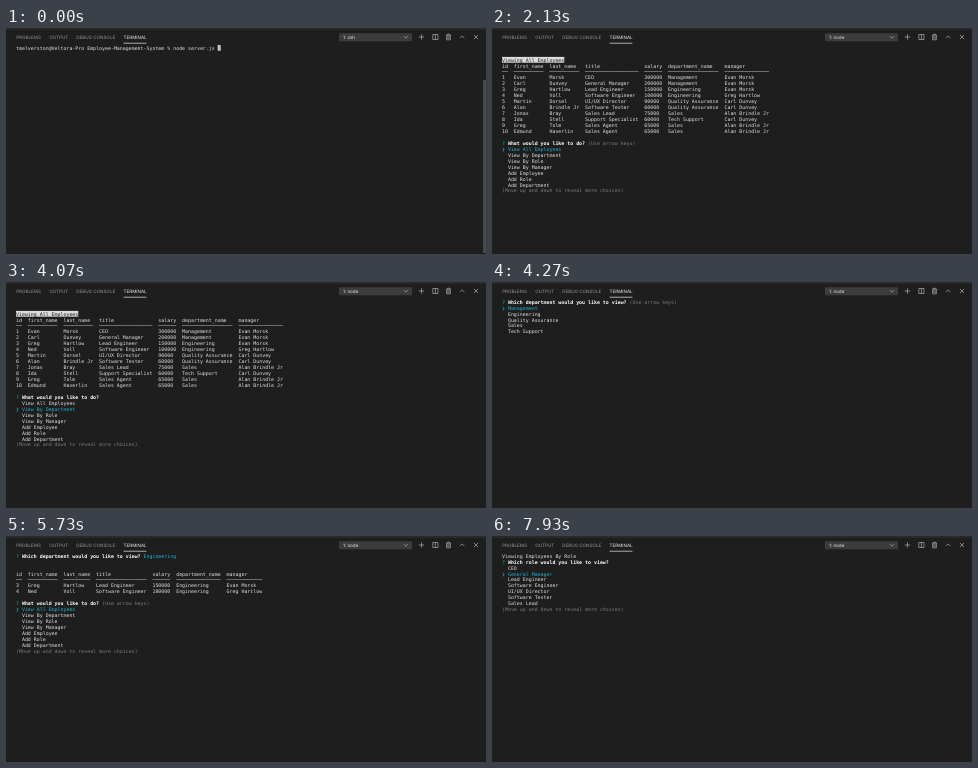
An HTML page for the animation above (8 s loop, 480x226 px).

```html
<!DOCTYPE html>
<html lang="en">
<head>
<meta charset="utf-8">
<title>Terminal session</title>
<style>
html, body { margin: 0; width: 100%; height: 100%; overflow: hidden; background: #1e1e1e; }
svg, pre { position: absolute; left: 0; top: 0; text-rendering: geometricPrecision; }
svg text { font: 4.55px Inter, sans-serif; fill: #989898; }
svg .on { fill: #ececec; }
svg path { fill: none; stroke: #c5c5c5; stroke-width: .6; }
pre {
  margin: 0; left: 10.2px; top: 17px; width: max-content;
  font: 49.27px/59.5px "DejaVu Sans Mono", monospace; color: #e2e2e2;
  transform: scale(.1); transform-origin: 0 0;
}
i { font-style: normal; }
.green { color: #0dbc79; }
.cyan { color: #1fb3d3; }
.dim { color: #7c7c7c; }
.bold { color: #fff; font-weight: bold; }
.inverse { color: #1e1e1e; background: #dcdcdc; }
.cursor { background: #c8c8c8; }
</style>
</head>
<body>
<svg width="480" height="226" viewBox="0 0 480 226">
  <rect width="480" height="1" y=".5" fill="#353535"/>
  <text x="10.2" y="11.1">PROBLEMS</text>
  <text x="43.2" y="11.1">OUTPUT</text>
  <text x="70.2" y="11.1">DEBUG CONSOLE</text>
  <text x="117.6" y="11.1" class="on">TERMINAL</text>
  <rect x="117.6" y="14.8" width="22.8" height=".7" fill="#e7e7e7"/>
  <rect x="333" y="5.2" width="73" height="8" rx=".8" fill="#3c3c3c"/>
  <text id="shell" x="337" y="10.9" class="on"></text>
  <path d="M397.8 8.2l2 2 2-2"/>
  <path d="M412.8 9h5.4M415.5 6.3v5.4"/>
  <path d="M426.8 6.5h5.2v5h-5.2zM429.4 6.5v5"/>
  <path d="M440 7.2h5M441.6 7v-.8h1.8V7M440.6 7.2v4.6h3.8V7.2M441.9 8.2v2.7M443.1 8.2v2.7"/>
  <path d="M454 10.1l2.2-2.2 2.2 2.2"/>
  <path d="M467.9 6.9l4.2 4.2M472.1 6.9l-4.2 4.2"/>
  <rect id="bar" x="477" y="52" width="3" height="173" fill="#484848"/>
</svg>
<pre id="term"></pre>
<script>
const $ = id => document.getElementById(id);
const paint = (name, s) => `<i class="${name}">${s}</i>`;

const tasks = ['View All Employees', 'View By Department', 'View By Role', 'View By Manager',
  'Add Employee', 'Add Role', 'Add Department'];
const departments = ['Management', 'Engineering', 'Quality Assurance', 'Sales', 'Tech Support'];
const roles = ['CEO', 'General Manager', 'Lead Engineer', 'Software Engineer', 'UI/UX Director',
  'Software Tester', 'Sales Lead'];

const header = 'id,first_name,last_name,title,salary,department_name,manager'.split(',');
const staff = `1,Evan,Morsk,CEO,300000,Management,Evan Morsk
2,Carl,Dunvey,General Manager,200000,Management,Evan Morsk
3,Greg,Hartlow,Lead Engineer,150000,Engineering,Evan Morsk
4,Ned,Voll,Software Engineer,100000,Engineering,Greg Hartlow
5,Martin,Dorsel,UI/UX Director,90000,Quality Assurance,Carl Dunvey
6,Alan,Brindle Jr,Software Tester,60000,Quality Assurance,Carl Dunvey
7,Jonas,Bray,Sales Lead,75000,Sales,Alan Brindle Jr
8,Ida,Stell,Support Specialist,60000,Tech Support,Carl Dunvey
9,Greg,Tolm,Sales Agent,65000,Sales,Alan Brindle Jr
10,Edmund,Haverlin,Sales Agent,65000,Sales,Alan Brindle Jr`.split('\n').map(s => s.split(','));

const banner = [
  '█▀▀ █▀▄▀█ █▀█ █░░ █▀█ █▄█ █▀▀ █▀▀   █▀▄▀█ ▄▀█ █▄░█ ▄▀█ █▀▀ █▀▀ █▀▄▀█ █▀▀ █▄░█ ▀█▀   █▀ █▄█ █▀ ▀█▀ █▀▀ █▀▄▀█',
  '██▄ █░▀░█ █▀▀ █▄▄ █▄█ ░█░ ██▄ ██▄   █░▀░█ █▀█ █░▀█ █▀█ █▄█ ██▄ █░▀░█ ██▄ █░▀█ ░█░   ▄█ ░█░ ▄█ ░█░ ██▄ █░▀░█'
].join('\n');

function table(rows) {
  const widths = header.map((h, i) => Math.max(h.length, ...rows.map(r => r[i].length)));
  const rule = widths.map(w => '─'.repeat(w));
  return [header, rule, ...rows]
    .map(r => r.map((s, i) => s.padEnd(widths[i])).join('  ')).join('\n');
}

const ask = question => `${paint('green', '?')} ${paint('bold', question)} `;

// The key hint stays until the selection first moves.
function menu(question, items, picked) {
  const lines = items.map((s, i) => i === picked ? paint('cyan', '❯ ' + s) : '  ' + s);
  if (items.length > 6) lines.push(paint('dim', '(Move up and down to reveal more choices)'));
  return ask(question) + (picked ? '' : paint('dim', '(Use arrow keys)')) + '\n' + lines.join('\n');
}

const whichDept = 'Which department would you like to view?';
const main = picked => menu('What would you like to do?', tasks, picked);
const dept = picked => menu(whichDept, departments, picked);
const role = picked => 'Viewing Employees By Role\n' + menu('Which role would you like to view?', roles, picked);

const command = 'tmelverston@Veltora-Pro Employee-Management-System % node server.js ';
const cursor = paint('cursor', ' ');
const everyone = `\n\n${paint('inverse', 'Viewing All Employees')}\n${table(staff)}\n\n`;
const engineers = `${ask(whichDept)}${paint('cyan', 'Engineering')}\n\n\n`
  + table(staff.filter(r => r[5] === 'Engineering')) + '\n\n';

const screens = [
  [0, command + cursor],
  [400, command + '\n' + cursor],
  [730, `\n\n${banner}\n\n\n${main(0)}`],
  [2130, everyone + main(0)],
  [3730, everyone + main(1)],
  [4270, dept(0)],
  [5200, dept(1)],
  [5670, engineers + main(0)],
  [6930, engineers + main(1)],
  [7200, engineers + main(2)],
  [7530, role(0)],
  [7930, role(1)]
];

let shown;
function draw() {
  const t = performance.now() % 8000;
  const screen = screens.filter(s => s[0] <= t).pop()[1];
  if (screen !== shown) $('term').innerHTML = shown = screen;
  $('shell').textContent = t < 530 ? '1: zsh' : '1: node';
  $('bar').style.display = t < 730 ? '' : 'none';
  requestAnimationFrame(draw);
}
draw();
</script>
</body>
</html>
```
